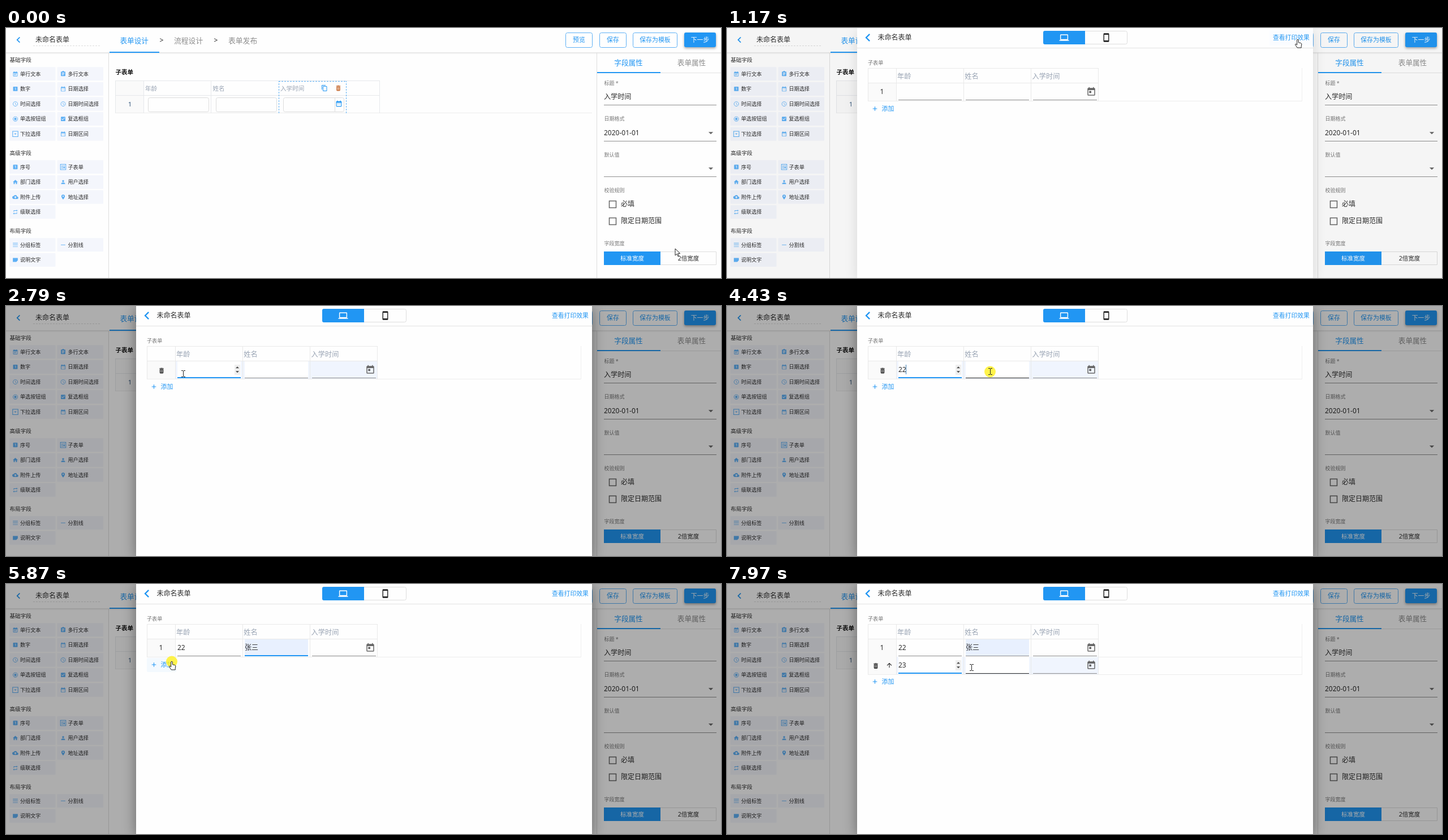
Animation, 1264 px wide and 443 px high, one loop 8 s. Source, as an HTML page with a canvas:

```html
<!DOCTYPE html>
<html lang="zh-CN">
<head>
<meta charset="utf-8">
<title>表单设计</title>
<style>
html, body { margin: 0; width: 100%; height: 100%; overflow: hidden; background: #fff; }
canvas { display: block; width: 1264px; height: 443px; }
</style>
</head>
<body>
<canvas id="stage" width="1264" height="443"></canvas>
<script>
const ctx = document.getElementById('stage').getContext('2d');
const FONT = '"Noto Sans", "Noto Sans CJK SC", "Noto Sans CJK", sans-serif';
const LOOP = 8000;
const BLUE = '#2196f3', SOFT = '#5eb0f5', LINE = '#e6e8eb', GREY = '#8c8c8c', INK = '#2b2b2b', HEAD = '#98a3b3';
const TINT = '#f0f5fe', FILLED = '#e8f0fe', WHITE = '#ffffff';

// Material style glyphs on a 24 unit grid
const CAL = 'M19 4h-1V2h-2v2H8V2H6v2H5a2 2 0 0 0-2 2v14a2 2 0 0 0 2 2h14a2 2 0 0 0 2-2V6a2 2 0 0 0-2-2zm0 16H5V9h14z';
const TILE = 'M19 3H5a2 2 0 0 0-2 2v14a2 2 0 0 0 2 2h14a2 2 0 0 0 2-2V5a2 2 0 0 0-2-2z';
const RING = 'M12 2a10 10 0 1 0 0 20 10 10 0 0 0 0-20zm0 2a8 8 0 1 1 0 16 8 8 0 0 1 0-16z';
const SQUARE = 'M0 0h24v24H0zM2.4 2.4v19.2h19.2V2.4z';
const ICONS = {
  back: 'M15.4 7.4 14 6l-6 6 6 6 1.4-1.4L10.8 12z',
  trash: 'M6 19a2 2 0 0 0 2 2h8a2 2 0 0 0 2-2V7H6zM19 4h-3.5l-1-1h-5l-1 1H5v2h14zM9 9h1.6v9H9zm4.4 0H15v9h-1.6z',
  copy: 'M16 1H4a2 2 0 0 0-2 2v14h2V3h12zm3 4H8a2 2 0 0 0-2 2v14a2 2 0 0 0 2 2h11a2 2 0 0 0 2-2V7a2 2 0 0 0-2-2zm0 16H8V7h11z',
  event: CAL + 'M7 11h5v5H7z',
  date: CAL + 'M7 12h2v2H7zm4 0h2v2h-2zm4 0h2v2h-2z',
  text: CAL + 'M7 11h10v2H7zm0 4h7v2H7z',
  clip: TILE + 'M9 3a3 3 0 0 1 6 0zM7 7h10v2H7zm0 4h10v2H7zm0 4h7v2H7z',
  one: TILE + 'M14 17h-2V9h-2V7h4z',
  clock: RING + 'M11 7h1.5v5.2l4.5 2.7-.8 1.2L11 13z',
  radio: RING + 'M12 7a5 5 0 1 0 0 10 5 5 0 0 0 0-10z',
  check: TILE + 'M10 17l-5-5 1.4-1.4 3.6 3.6 7.6-7.6L19 8z',
  drop: SQUARE + 'M7 10h10l-5 5z',
  table: SQUARE + 'M5 6h6v3H5zm8 0h6v3h-6zM5 11.5h6v2H5zm8 0h6v6h-6zM5 16h6v2H5z',
  home: 'M10 20v-6h4v6h5v-8h3L12 3 2 12h3v8z',
  user: 'M12 12a4 4 0 1 0 0-8 4 4 0 0 0 0 8zm0 2c-2.7 0-8 1.3-8 4v2h16v-2c0-2.7-5.3-4-8-4z',
  cloud: 'M19.3 10A7.5 7.5 0 0 0 5.3 8 6 6 0 0 0 6 20h13a5 5 0 0 0 .3-10zM14 13v4h-4v-4H7l5-5 5 5z',
  pin: 'M12 2a7 7 0 0 0-7 7c0 5.2 7 13 7 13s7-7.8 7-13a7 7 0 0 0-7-7zm0 9.5a2.5 2.5 0 1 1 0-5 2.5 2.5 0 0 1 0 5z',
  loop: 'M7 7h10v3l4-4-4-4v3H5v6h2zm10 10H7v-3l-4 4 4 4v-3h12v-6h-2z',
  lines: 'M2 4h20v2H2zm0 7h20v2H2zm0 7h20v2H2z',
  dash: 'M3 11h18v2H3z',
  note: 'M2 4h20v10l-6 6H2z',
  laptop: 'M20 18a2 2 0 0 0 2-2V6a2 2 0 0 0-2-2H4a2 2 0 0 0-2 2v10a2 2 0 0 0 2 2H0v2h24v-2zM4 6h16v10H4z',
  phone: 'M17 1H7a2 2 0 0 0-2 2v18a2 2 0 0 0 2 2h10a2 2 0 0 0 2-2V3a2 2 0 0 0-2-2zm0 18H7V5h10z',
  up: 'M4 12l1.4 1.4L11 7.8V20h2V7.8l5.6 5.6L20 12l-8-8z',
  plus: 'M19 13h-6v6h-2v-6H5v-2h6V5h2v6h6z',
  down: 'M3 8h18l-9 9z',
  rise: 'M3 17h18l-9-9z'
};
const paths = {};
for (const name in ICONS) paths[name] = new Path2D(ICONS[name]);
const ARROW = new Path2D('M0 0v12l2.9-2.6 2 4.2 1.8-.8-2-4.2h4z');
const HAND = new Path2D('M-1.3 1Q0-.8 1.3 1V5.8L5.4 6.7Q7 7.2 6.9 9L6.2 12.4V15H-.8L-4.4 9.8Q-4.6 8-3 8.4L-1.3 10z');

// Backdrop shade applied to every colour of the page behind the dialog
let dim = 0;
function tone(hex) {
  const part = i => Math.round(parseInt(hex.slice(i, i + 2), 16) * (1 - dim));
  return `rgb(${part(1)},${part(3)},${part(5)})`;
}
function box(x, y, w, h, color, r = 0) {
  ctx.fillStyle = tone(color);
  ctx.beginPath();
  ctx.roundRect(x, y, w, h, r);
  ctx.fill();
}
function frame(x, y, w, h, color, r = 0) {
  ctx.strokeStyle = tone(color);
  ctx.lineWidth = 1;
  ctx.beginPath();
  ctx.roundRect(x + 0.5, y + 0.5, w - 1, h - 1, r);
  ctx.stroke();
}
function shadowBox(x, y, w, h, color, r, alpha, blur, drop) {
  ctx.save();
  ctx.shadowColor = `rgba(0,0,0,${alpha})`;
  ctx.shadowBlur = blur;
  ctx.shadowOffsetY = drop;
  box(x, y, w, h, color, r);
  ctx.restore();
}
const hline = (x1, x2, y, color, w = 1) => box(x1, y, x2 - x1, w, color);
const vline = (x, y1, y2, color) => box(x, y1, 1, y2 - y1, color);
function dashes(x1, y1, x2, y2, color) {
  ctx.strokeStyle = tone(color);
  ctx.lineWidth = 1;
  ctx.setLineDash([3, 2]);
  ctx.beginPath();
  ctx.moveTo(x1, y1);
  ctx.lineTo(x2, y2);
  ctx.stroke();
  ctx.setLineDash([]);
}
function label(str, x, y, size, color = INK, align = 'left', weight = 400) {
  ctx.font = `${weight} ${size}px ${FONT}`;
  ctx.textAlign = align;
  ctx.fillStyle = tone(color);
  ctx.fillText(str, x, Math.round(y + size * 0.37));
}
function icon(name, x, y, size, color) {
  ctx.save();
  ctx.translate(x - size / 2, y - size / 2);
  ctx.scale(size / 24, size / 24);
  ctx.fillStyle = tone(color);
  ctx.fill(paths[name], 'evenodd');
  ctx.restore();
}

const GROUPS = [
  ['基础字段', 56, ['text 单行文本', 'clip 多行文本', 'one 数字', 'date 日期选择', 'clock 时间选择', 'clock 日期时间选择',
    'radio 单选按钮组', 'check 复选框组', 'drop 下拉选择', 'date 日期区间']],
  ['高级字段', 221, ['one 序号', 'table 子表单', 'home 部门选择', 'user 用户选择', 'cloud 附件上传', 'pin 地址选择', 'loop 级联选择']],
  ['布局字段', 359, ['lines 分组标签', 'dash 分割线', 'note 说明文字']]
];

function drawPalette() {
  for (const [title, top, items] of GROUPS) {
    label(title, 6.5, top, 9.6);
    items.forEach((item, i) => {
      const [glyph, name] = item.split(' ');
      const x = i % 2 ? 90.5 : 6, y = top + 25.3 + Math.floor(i / 2) * 26.6;
      box(x, y - 12, 81.5, 24, '#f4f6fc', 1);
      icon(glyph, x + 10.5, y, 10.5, SOFT);
      label(name, x + 19, y, 9.1);
    });
  }
}

function drawHeader(hover) {
  icon('back', 22, 21, 21, BLUE);
  label('未命名表单', 52, 21, 12);
  dashes(48, 31.5, 168, 31.5, '#dddddd');
  label('表单设计', 201.5, 22, 12.6, BLUE);
  label('>', 275, 22, 12, INK, 'center');
  label('流程设计', 297, 22, 12.8, GREY);
  label('>', 371, 22, 12, INK, 'center');
  label('表单发布', 393, 22, 12.8, GREY);
  hline(183, 271, 42, BLUE, 2);
  if (hover) box(989, 8, 48, 26, '#edf6fe', 3);
  for (const [name, x, w] of [['预览', 989, 48], ['保存', 1049, 48], ['保存为模板', 1108, 79]]) {
    frame(x, 8, w, 27, SOFT, 3);
    label(name, x + w / 2, 21, 10.9, BLUE, 'center');
  }
  shadowBox(1199, 8, 56, 26, BLUE, 3, 0.35, 4, 2);
  label('下一步', 1227, 21, 10.8, WHITE, 'center', 500);
}

function drawSubform() {
  label('子表单', 193.5, 78, 10.5, '#111111', 'left', 700);
  box(194, 94, 50, 57, '#fafafa');
  for (const y of [93, 119]) hline(193, 661, y, LINE);
  hline(193, 1036, 150, '#ececec');
  for (const x of [193, 243, 362, 660]) vline(x, 93, 151, LINE);
  ['年龄', '姓名', '入学时间'].forEach((name, i) => {
    const x = 244 + i * 119.5;
    label(name, x + 2, 107, 10.6, HEAD);
    frame(Math.round(x + 7), 123, 108, 26, '#dddddd', 3);
  });
  vline(581, 124, 148, '#dddddd');
  label('1', 219, 135, 11.5, '#37597d', 'center');
  dashes(482.5, 151, 482.5, 94, SOFT);
  dashes(601.5, 151, 601.5, 94, SOFT);
  dashes(482, 94.5, 601, 94.5, SOFT);
  icon('copy', 563, 106.5, 12, BLUE);
  icon('trash', 587.5, 106.5, 13, '#c8713a');
  icon('date', 588.5, 134, 13, BLUE);
}

function drawSettings() {
  label('字段属性', 1100.5, 61, 12.6, BLUE, 'center');
  label('表单属性', 1212, 61, 12.6, GREY, 'center');
  hline(1045, 1264, 79, '#e2e2e2');
  hline(1045, 1157, 78, BLUE, 2);
  [['标题 *', 98], ['日期格式', 161], ['默认值', 225], ['校验规则', 288], ['字段宽度', 382]]
    .forEach(([name, y]) => label(name, 1057.5, y, 9, '#757575'));
  for (const y of [136, 200, 263]) hline(1057, 1256, y, '#8f8f8f');
  label('入学时间', 1057, 122, 12.1);
  label('2020-01-01', 1057, 185.5, 12);
  for (const y of [186, 249]) icon('down', 1246, y, 11, '#666666');
  [['必填', 312], ['限定日期范围', 342]].forEach(([name, y]) => {
    ctx.strokeStyle = tone('#666666');
    ctx.lineWidth = 1.5;
    ctx.strokeRect(1066.5, y - 5.5, 12, 12);
    label(name, 1087, y, 12);
  });
  frame(1156, 396, 100, 24, '#dddddd');
  box(1057, 396, 100, 24, BLUE);
  label('标准宽度', 1107, 408, 10.5, WHITE, 'center');
  label('2倍宽度', 1206.5, 408, 10.5, INK, 'center');
}

function drawPage(t, pos) {
  dim = t < 1170 ? 0 : t < 1250 ? 0.035 : 0.32;
  box(0, 0, 1264, 443, '#fefefe');
  hline(0, 1264, 43, '#e4e4e4');
  hline(0, 1264, 44, '#f2f2f2', 2);
  vline(181, 44, 443, '#dedede');
  vline(1044, 44, 443, '#dedede');
  drawPalette();
  drawHeader(t < 1170 && inside(pos, 989, 8, 48, 27));
  drawSubform();
  drawSettings();
  dim = 0;
}

const inside = (p, x, y, w, h) => p.x >= x && p.x < x + w && p.y >= y && p.y < y + h;
const between = (t, a, b) => t >= a && t < b;

function drawField(x, y, w, focus, hover) {
  if (focus) hline(x, x + w, y + 28, BLUE, 2);
  else hline(x, x + w, y + 29, hover ? '#222222' : '#8d8d8d');
}

function drawRow(row, y, pos) {
  const hot = inside(pos, 249, y, 768, 31);
  const over = x => inside(pos, x, y, 113, 31);
  box(250, y, 49, 31, '#fafafa');
  if (hot) {
    box(300, y, 356, 31, TINT);
    box(303, y, 112, 29, WHITE);
    box(422, y, 112, 29, WHITE);
  }
  if (row.name) box(422, y, 112, 29, FILLED);
  if (!hot) label(row.no, 274, y + 15, 12, INK, 'center');
  else if (!row.many) icon('trash', 275, y + 16.5, 13, '#333333');
  else {
    icon('trash', 263, y + 16, 13, '#333333');
    icon(row.no === '1' ? 'down' : 'up', 287, y + 15, 13, '#222222');
  }
  drawField(303, y, 112, row.focus === 'age', over(303));
  drawField(422, y, 112, row.focus === 'name', over(422));
  drawField(541, y, 113, false, over(541));
  label(row.age, 303, y + 14.6, 12);
  label(row.name, 422, y + 14.6, 12);
  if (row.caret) {
    const x = row.focus === 'age' ? 303 + row.age.length * 6.6 : 422;
    vline(Math.round(x), y + 6, y + 23, '#3f7fb5');
  }
  if (row.focus === 'age' || (hot && over(303))) {
    box(404, y + 6, 10, 18, '#efefef');
    icon('rise', 409, y + 10.5, 8, '#444444');
    icon('down', 409, y + 18.5, 8, '#444444');
  }
  icon('event', 644, y + 14.3, 18, '#666666');
  hline(249, 1017, y + 31, '#ececec');
  for (const x of [249, 299, 418, 537, 656]) vline(x, y, y + 31, '#e9e9e9');
}

function drawPopup(t) {
  shadowBox(422, 131, 161, 40, WHITE, 2, 0.3, 5, 1);
  if (t >= 4740) box(422, 137, 161, 27, '#eeeeee');
  label('张三', 431, 150.5, 10.5);
}

function drawDialog(t, pos) {
  shadowBox(230, 0, 806, 443, '#fefefe', 0, t < 1250 ? 0.12 : 0.4, 22, 4);
  hline(230, 1036, 35, '#e2e2e2');
  icon('back', 249, 17, 28, BLUE);
  label('未命名表单', 266.5, 17, 12);
  frame(559, 5, 149, 24, '#dddddd', 3);
  box(559, 5, 74, 24, BLUE, [3, 0, 0, 3]);
  icon('laptop', 596, 17, 17, WHITE);
  icon('phone', 670.5, 17, 17, '#222222');
  if (inside(pos, 959, 4, 77, 27)) box(959, 4, 77, 27, t < 1250 ? '#fafcff' : '#f3f9fe');
  label('查看打印效果', 965, 17, 10.8, BLUE);

  label('子表单', 249, 61.5, 9.1, '#757575');
  hline(249, 657, 71, '#e9e9e9');
  hline(249, 657, 97, '#e9e9e9');
  for (const x of [249, 299, 418, 537, 656]) vline(x, 71, 98, '#e9e9e9');
  ['年龄', '姓名', '入学时间'].forEach((name, i) => label(name, 301 + i * 119.3, 85, 12.2, HEAD));

  const many = t >= 6040;
  drawRow({
    no: '1', many,
    age: t < 3570 ? '' : t < 4030 ? '2' : '22',
    name: t < 4820 ? '' : '张三',
    focus: between(t, 2300, 4500) ? 'age' : between(t, 4500, 6000) ? 'name' : '',
    caret: between(t, 2300, 2790) || between(t, 3250, 4820)
  }, 98, pos);
  if (many) drawRow({
    no: '2', many,
    age: t < 7280 ? '' : t < 7430 ? '2' : '23',
    name: '',
    focus: t >= 6510 ? 'age' : '',
    caret: between(t, 6510, 6960) || between(t, 7280, 7900)
  }, 129, pos);
  vline(1016, 71, many ? 161 : 130, '#f0f0f0');

  const y = many ? 173 : 143;
  if (!many && inside(pos, 249, 131, 52, 25)) box(249, 131, 52, 25, '#f3f9fe', 2);
  icon('plus', 261.5, y, 13, BLUE);
  label('添加', 273.5, y, 10.9, BLUE);
  if (between(t, 4510, 5390)) drawPopup(t);
}

// Pointer path: time, x, y of the hot spot
const MOVES = [
  [0, 1183, 391], [70, 1183, 391], [840, 1009, 20], [1380, 1009, 20], [2240, 313, 120], [4040, 313, 120],
  [4360, 465, 116], [4560, 465, 116], [4800, 463, 141], [4970, 460, 142], [5160, 453, 140], [5390, 453, 140],
  [5790, 293, 137], [6160, 293, 137], [6500, 345, 147], [7660, 345, 147], [7900, 432, 148], [LOOP, 432, 148]
];
const CLICKS = [[850, 1010], [2240, 2400], [4390, 4560], [5310, 5400], [5830, 6030], [6500, 6660]];

function pointer(time) {
  const t = Math.max(0, 70 + Math.floor((time - 70) / 78) * 78);
  const i = MOVES.findIndex((m, n) => n && t < m[0]);
  const [t0, x0, y0] = MOVES[i - 1], [t1, x1, y1] = MOVES[i];
  const k = (t - t0) / (t1 - t0), e = k * k * (3 - 2 * k);
  return { x: Math.round(x0 + (x1 - x0) * e), y: Math.round(y0 + (y1 - y0) * e) };
}

function pointerKind(t, p) {
  if (t < 1170) return inside(p, 989, 8, 48, 27) ? 'hand' : 'arrow';
  if (inside(p, 959, 4, 77, 27)) return 'hand';
  if (t < 6040 && inside(p, 249, 131, 52, 25)) return 'hand';
  const bottom = t < 6040 ? 129 : 160;
  const field = [303, 422, 541].some(x => inside(p, x, 98, 113, bottom - 98));
  return field ? 'beam' : 'arrow';
}

function drawPointer(t, p) {
  if (CLICKS.some(([a, b]) => between(t, a, b))) {
    ctx.fillStyle = 'rgba(255,240,30,.8)';
    ctx.beginPath();
    ctx.arc(p.x, p.y + 0.5, 10, 0, Math.PI * 2);
    ctx.fill();
  }
  const kind = pointerKind(t, p);
  if (kind === 'beam') {
    vline(p.x, p.y - 5, p.y + 5, '#222222');
    for (const y of [-6, 5]) {
      hline(p.x - 3, p.x, p.y + y, '#222222');
      hline(p.x + 1, p.x + 4, p.y + y, '#222222');
    }
    return;
  }
  ctx.save();
  ctx.translate(p.x, p.y);
  ctx.fillStyle = '#fff';
  ctx.strokeStyle = '#222';
  ctx.lineWidth = 1;
  const shape = kind === 'hand' ? HAND : ARROW;
  ctx.fill(shape);
  ctx.stroke(shape);
  ctx.restore();
}

const start = performance.now();
function render() {
  const t = (performance.now() - start) % LOOP;
  const pos = pointer(t);
  drawPage(t, pos);
  if (t >= 1170) drawDialog(t, pos);
  drawPointer(t, pos);
  requestAnimationFrame(render);
}
render();
</script>
</body>
</html>
```
